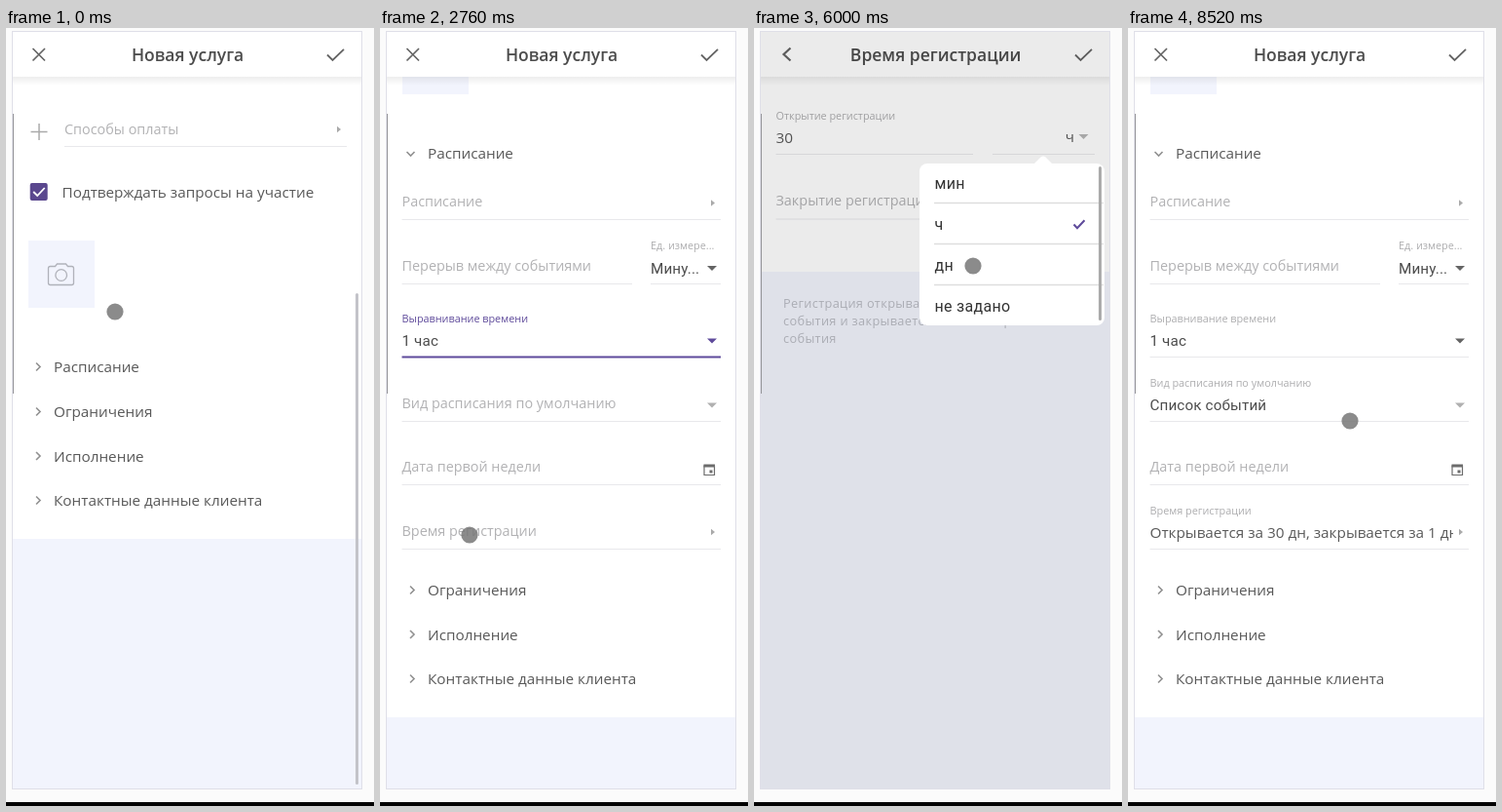
An HTML page for the animation above (8640 ms loop, 378 by 798 pixels).

```html
<!DOCTYPE html>
<html lang="ru">
<head>
<meta charset="utf-8">
<style>
html, body { margin: 0; width: 100%; height: 100%; overflow: hidden; background: #fbfbfb; }
svg { display: block; width: 378px; height: 798px; }
text { font-family: "Open Sans", sans-serif; font-size: 15.3px; fill: #595959; white-space: pre; }
.title { font-size: 17.5px; font-weight: 600; fill: #4c4c4c; text-anchor: middle; }
.label { font-size: 14.4px; fill: #b2b2b4; }
.small { font-size: 10.85px; fill: #adadaf; }
.hint { font-size: 12.75px; letter-spacing: .35px; fill: #b9bbc3; }
.end { font-size: 15.1px; text-anchor: end; }
.roboto { font-family: Roboto, sans-serif; font-size: 15.2px; letter-spacing: .15px; fill: #4c4c4c; }
.option { font-family: Roboto, sans-serif; font-size: 16px; letter-spacing: .3px; fill: #333; }
.accent { fill: #5f4b9b; }
</style>
</head>
<body>
<svg id="stage" viewBox="0 0 378 798"></svg>
<script>
const LOOP = 8640, STEP = 120, GLIDE = 300;
const BLUE = '#f2f4fd', PURPLE = '#5f4b9b', LINE = '#e8e8eb', ICON = '#646464';
const SCROLL = 219, BODY = 402;

const CUE = {
  expand: 360, scroll: 1200,
  alignOpen: 1800, alignPick: 2520, viewOpen: 3240, viewPick: 3720,
  registration: 4200, typeOpen: 5160, openMenu: 5640, openPick: 6120,
  typeClose: 6600, closeMenu: 7320, closePick: 7920, back: 8400
};

// The pointer reaches each [time, x, y] at the end of a short glide.
const STOPS = [
  [0, 112, 291], [720, 120, 610], [1560, 120, 395], [2520, 92, 520], [3120, 110, 388],
  [3720, 95, 525], [4920, 139, 114], [6000, 225, 244], [6480, 50.5, 159],
  [7320, 335, 178], [7680, 245.5, 313], [8160, 338, 27], [8520, 228, 403]
];

function ramp(t, start, duration = 2 * STEP) {
  const k = Math.min(1, Math.max(0, (t - start) / duration));
  return k * k * (3 - 2 * k);
}
const pulse = (t, from, to, fade) => ramp(t, from, fade) - ramp(t, to, fade);

function pointer(t) {
  let [, x, y] = STOPS[0];
  for (const [time, toX, toY] of STOPS.slice(1)) {
    const k = ramp(t, time - GLIDE, GLIDE);
    x += (toX - x) * k;
    y += (toY - y) * k;
  }
  return `<circle cx="${x}" cy="${y}" r="8.6" fill="#777" opacity=".85"/>`;
}

const text = (x, y, str, cls = '') => `<text x="${x}" y="${y}" class="${cls}">${str}</text>`;
const rect = (x, y, w, h, fill, extra = '') => `<rect x="${x}" y="${y}" width="${w}" height="${h}" fill="${fill}" ${extra}/>`;
const stroke = (d, color, width) => `<path d="${d}" fill="none" stroke="${color}" stroke-width="${width}"/>`;
const shift = (content, dy) => `<g transform="translate(0 ${dy})">${content}</g>`;
const fade = (content, opacity) => opacity > 0 ? `<g opacity="${opacity}">${content}</g>` : '';
const rule = (x1, x2, y, color = LINE, width = 1) => stroke(`M${x1} ${y}H${x2}`, color, width);
const down = (x, y, color) => `<path d="M${x - 5} ${y - 2}h10l-5 5z" fill="${color}"/>`;
const right = (x, y) => `<path d="M${x - 2} ${y - 3.3}l4 3.3l-4 3.3z" fill="#aaa"/>`;

function field(label, value, y, { x2 = 350, cls = '', focus = false, open = false } = {}) {
  const content = value || open
    ? text(22.5, y - 35.5, label, focus ? 'small accent' : 'small') + text(22.5, y - 10.7, value, cls)
    : text(22.5, y - 13.5, label, 'label');
  return content + rule(22.5, x2, y + .5, focus ? PURPLE : LINE, focus ? 2 : 1);
}

function select(label, value, y, open, focus, color) {
  return field(label, value, y, { cls: 'roboto', open, focus }) + down(341, y - 16.5, focus ? PURPLE : color);
}

function section(name, y, open) {
  const mark = open ? `M27.5 ${y - 2}l4 4l4 -4` : `M31 ${y - 4.5}l4 4l-4 4`;
  return stroke(mark, '#909090', 1.6) + text(49, y + 5, name);
}

function header(title, back) {
  const icon = back ? 'M37.5 20.5L30.5 27L37.5 33.5' : 'M27.5 21L40 33.5M40 21L27.5 33.5';
  return rect(7, 50, 358, 9, 'url(#shade)') + rect(7, 4, 358, 46, '#fff')
    + stroke(icon, ICON, back ? 2.2 : 1.7)
    + stroke('M330 27.5L335.5 33L347 21.8', ICON, 1.8)
    + text(186.6, 34, title, 'title');
}

function camera() {
  return rect(23, -1, 68, 69, BLUE)
    + stroke('M45.5 25.5h5l2 -2.5h9l2 2.5h4q2 0 2 2v15q0 2 -2 2h-22q-2 0 -2 -2v-15q0 -2 2 -2z', '#b0b2ba', 1.3)
    + '<circle cx="56.7" cy="34.5" r="5.8" fill="none" stroke="#b0b2ba" stroke-width="1.3"/>';
}

function calendar() {
  return stroke('M333 449h10.5v9.5h-10.5z', '#6c6c6c', 1.2)
    + rect(332.5, 447.5, 11.5, 3, '#6c6c6c') + rect(338.5, 453.5, 3, 3, '#6c6c6c');
}

function schedule(t) {
  const align = t > CUE.alignPick ? '1 час' : '';
  const view = t > CUE.viewPick ? 'Список событий' : '';
  const summary = t >= CUE.back ? 'Открывается за 30 дн, закрывается за 1 дн' : '';
  const alignOpen = t >= CUE.alignOpen, viewOpen = t >= CUE.viewOpen;
  return field('Расписание', '', 196) + right(342, 179.5)
    + field('Перерыв между событиями', '', 262, { x2: 259 })
    + text(278, 227, 'Ед. измере...', 'small') + text(278, 251.5, 'Мину...', 'roboto')
    + rule(278, 350, 262.5) + down(341, 246, ICON)
    + select('Выравнивание времени', align, 337, alignOpen, alignOpen && !viewOpen, ICON)
    + select('Вид расписания по умолчанию', view, 403, viewOpen, viewOpen && t < CUE.registration, '#b0b0b0')
    + field('Дата первой недели', '', 468) + calendar()
    + `<g clip-path="url(#summary)">${field('Время регистрации', summary, 534)}</g>`
    + rule(334, 350, 534.5) + right(342, 517);
}

function panel(options, top, height, opacity) {
  return fade(rect(7, top, 358, height, '#fff', 'rx="3" filter="url(#lift)"')
    + options.map((name, i) => text(23, top + 30 + 48 * i, name, 'roboto')).join(''), opacity);
}

function servicePage(t) {
  const expand = ramp(t, CUE.expand, 3 * STEP);
  const scroll = ramp(t, CUE.scroll, 3 * STEP);
  const thumb = 1 - ramp(t, STEP, 4 * STEP) + pulse(t, CUE.scroll, 1680, STEP);
  const [thumbY, thumbHeight] = t < CUE.scroll ? [272, 504] : [211 + 109 * scroll, 365];
  const top = rule(60, 350, -97.5) + text(60, -110, 'Способы оплаты', 'label') + right(342, -115)
    + stroke('M25.5 -112.5h17M34 -121v17', '#aaa', 1.5)
    + rect(24.7, -60, 18, 18, '#5a478e', 'rx="2"') + stroke('M28.2 -51l4 4l7.5 -8', '#fff', 1.8)
    + text(57.5, -45, 'Подтверждать запросы на участие')
    + camera() + section('Расписание', 129, expand > 0);
  const rest = rect(7, 554, 358, 154, '#fff') + rect(7, 707, 358, 1000, BLUE)
    + ['Ограничения', 'Исполнение', 'Контактные данные клиента']
      .map((name, i) => section(name, 577 + 45.5 * i)).join('');
  const content = top + (expand ? schedule(t) : '') + shift(rest, -BODY * (1 - expand));
  return rect(7, 4, 358, 776, '#fff') + shift(content, SCROLL * (1 - scroll))
    + fade(rect(359, thumbY, 3, thumbHeight, '#c3c3c9', 'rx="1.5"'), thumb)
    + panel(['5 минут', '10 минут', '15 минут', '30 минут', '1 час'], 295, 253,
        pulse(t, CUE.alignOpen, CUE.alignPick, STEP))
    + panel(['День', 'Неделя', 'Месяц', 'Список событий', 'Ресурсы'], 362, 256,
        pulse(t, CUE.viewOpen, CUE.viewPick, STEP))
    + header('Новая услуга', false);
}

function popover(selected, dy, opacity) {
  const names = ['мин', 'ч', 'дн', 'не задано'];
  const rows = names.map((name, i) => text(185.5, 230.5 + 42 * i, name, 'option')
    + (i < 3 ? rule(185, 359, 245.5 + 42 * i, '#dedede', 1.3) : ''));
  const body = '<path d="M287 206l7.5 -7.5q2.5 -2 5 0l7.5 7.5z" fill="#fff"/>'
    + rect(170, 205, 190, 166, '#fff', 'rx="8"') + rows.join('')
    + stroke(`M328.5 ${225.5 + 42 * names.indexOf(selected)}l3.5 3.7l7.5 -8`, PURPLE, 2)
    + rect(354, 208, 3, 158, '#ababab', 'rx="1.5"');
  return fade(rect(7, 4, 358, 776, '#000', 'opacity=".08"') + shift(body, dy), opacity);
}

function limit(label, value, unit, y, open) {
  return field(label, value, y, { x2: 225, open })
    + text(329, y - 12.5, unit, 'end') + down(338.5, y - 18, '#b5b5b5') + rule(245, 350, y + .5);
}

function registrationPage(t) {
  const typed = (value, start) => value.slice(0, Math.max(0, Math.floor((t - start) / STEP)));
  const unitOf = (value, pick) => !value ? 'не задано' : t < pick ? 'ч' : 'дн';
  const open = typed('30', CUE.typeOpen), close = typed('1', CUE.typeClose);
  const openUnit = unitOf(open, CUE.openPick), closeUnit = unitOf(close, CUE.closePick);
  const ending = close ? `за ${close} ${closeUnit} до начала` : 'после завершения';
  const hint = open
    ? [`Регистрация открывается за ${open} ${openUnit} до начала`, `события и закрывается ${ending}`, 'события']
    : ['Регистрация открыта до завершения события'];
  return rect(7, 4, 358, 246, '#fff') + rect(7, 250, 358, 530, BLUE)
    + limit('Открытие регистрации', open, openUnit, 129, t >= CUE.typeOpen)
    + limit('Закрытие регистрации', close, closeUnit, 195.5, t >= CUE.typeClose)
    + hint.map((line, i) => text(30, 286.5 + 18.3 * i, line, 'hint')).join('')
    + header('Время регистрации', true)
    + popover(openUnit, -66, pulse(t, CUE.openMenu, CUE.openPick))
    + popover(closeUnit, 0, pulse(t, CUE.closeMenu, CUE.closePick));
}

const DEFS = `<defs>
  <linearGradient id="shade" x2="0" y2="1"><stop stop-color="#000" stop-opacity=".07"/><stop offset="1" stop-color="#000" stop-opacity="0"/></linearGradient>
  <clipPath id="page"><rect x="7" y="4" width="358" height="776"/></clipPath>
  <clipPath id="summary"><rect x="20" y="480" width="314" height="60"/></clipPath>
  <filter id="lift" x="-10%" y="-10%" width="120%" height="120%"><feDropShadow dx="0" dy="2" stdDeviation="3" flood-opacity=".25"/></filter>
</defs>`;

function picture(t) {
  const registration = t < CUE.back ? ramp(t, CUE.registration) : 0;
  return DEFS + rect(0, 0, 378, 798, '#fbfbfb')
    + `<g clip-path="url(#page)">${servicePage(t)}${fade(registrationPage(t), registration)}</g>`
    + rect(6.5, 3.5, 359, 777, 'none', 'stroke="#dfdfe8"')
    + rect(7, 88, 1, 287, '#97979b')
    + rect(0, 794, 378, 4, '#000')
    + pointer(t);
}

const stage = document.getElementById('stage');
const start = performance.now();
let shown = -1;
function tick(now) {
  const t = Math.floor(Math.max(0, now - start) % LOOP / STEP) * STEP;
  if (t !== shown) stage.innerHTML = picture(shown = t);
  requestAnimationFrame(tick);
}
tick(start);
</script>
</body>
</html>
```
